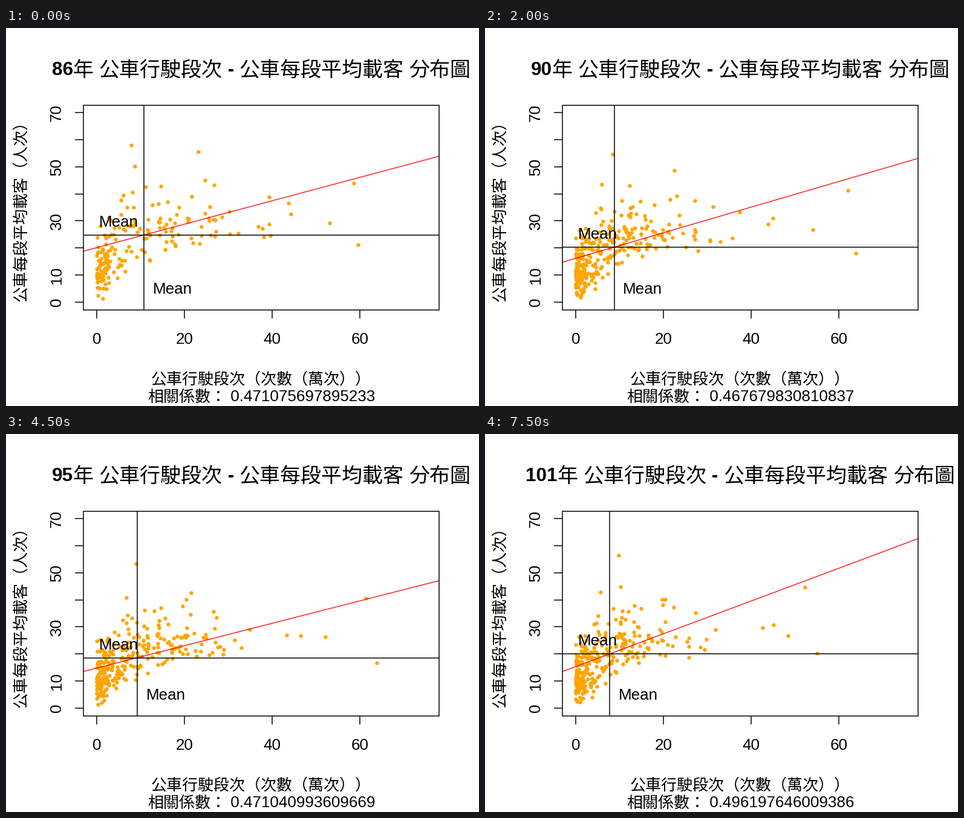
Animation of 782 by 626 pixels, one loop 8 s. Source, as a matplotlib script:

```python
import numpy as np
import matplotlib.pyplot as plt
from matplotlib.animation import FuncAnimation
from matplotlib.patches import Rectangle

W, H, DPI = 782, 626, 100
PX = 72 / DPI                               # points per pixel
LEFT, RIGHT, TOP, BOTTOM = 128, 716, 127.5, 466.5
CJK, LATIN = "Noto Sans CJK JP", "Liberation Sans"
LINE = 1.5 * PX
FIRST, FRAMES = 86, 16

# Key years; the years between are interpolated
YEARS = [86, 89, 92, 95, 97, 99, 101]
CORR = [0.471075697895233, 0.515746553273592, 0.371546385885326,
        0.471040993609669, 0.510584750146721, 0.564469082920185,
        0.496197646009386]
MEAN_X = [10.83, 8.41, 9.52, 9.24, 8.62, 8.14, 7.72]
MEAN_Y = [24.8, 20.8, 19.3, 18.6, 20.0, 19.65, 20.0]
SLOPE = [.433, .546, .329, .414, .551, .650, .606]

# Routes far from the crowd, in the first and the last year
START = np.array([(58.6, 44), (53.1, 29.3), (59.6, 21.2), (43.7, 36.6),
                  (44.3, 32.5), (39.3, 38.8), (37.8, 27.1), (23.2, 55.6),
                  (7.9, 57.9)])
END = np.array([(52.3, 44.6), (45.1, 30.7), (55, 20.2), (48.4, 26.7),
                (42.6, 29.6), (31.9, 28.9), (29.8, 25.4), (20.4, 40.2),
                (9.8, 56.5)])

rng = np.random.RandomState(7)
N = 285
rank = rng.permutation((np.arange(N) + .5) / N)
base_x = np.interp(rank, [0, .12, .4, .6, .84, .95, 1],
                   [0, .3, 2.2, 6, 13.5, 20, 28])
skew = np.clip((rng.gamma(4, 1, N) - 4) / 2, -1.8, 3)
phase = rng.uniform(0, 2 * np.pi, (2, N))


def sx(v):
    return LEFT + (RIGHT - LEFT) * (v + 3) / 81


def sy(v):
    return BOTTOM - (BOTTOM - TOP) * (v + 2.8) / 75.6


def crowd(year, mx, my):
    x = base_x * mx / 8 * (1 + .1 * np.sin(phase[0] + .5 * year))
    mid = np.interp(x, [0, 2, 5, 9, 14, 35], [11, 13, 19, 25, 26, 27])
    spread = np.interp(x, [0, 2, 5, 9, 14, 22], [5.5, 6.5, 8, 8.5, 6, 4.5])
    z = skew + .2 * np.sin(phase[1] + .6 * year)
    y = np.maximum((mid + spread * z) * np.sqrt(my / 20), .5)
    n = min(N, 180 + 27 * (year - FIRST))
    return x[:n], y[:n]


def outliers(year):
    """Drift from START to END; long routes swell midway, loads dip."""
    t = (year - FIRST) / (FRAMES - 1)
    x, y = (START + (END - START) * t).T
    arc = np.sin(np.pi * t)
    return x + .5 * arc * np.maximum(START[:, 0] - 45, 0), y - 4 * arc


def put(x, y, s, size, font=LATIN, **kw):
    ax.text(x, y, s, fontsize=size * PX, family=font, va="baseline",
            color="black", **kw)


def em(s, font):
    if font == CJK:
        return len(s)
    return sum({" ": .278, ".": .278, "-": .333}.get(c, .556) for c in s)


def put_runs(cx, runs, sizes, bases, **latin):
    """Centre a line that alternates between the two fonts."""
    x = cx - sum(em(s, f) * sizes[f] for s, f in runs) / 2
    for s, f in runs:
        put(x, bases[f], s, sizes[f], f, **(latin if f == LATIN else {}))
        x += em(s, f) * sizes[f]


def line(xs, ys, color="black", width=LINE):
    ax.plot(xs, ys, color=color, lw=width, solid_capstyle="butt")


def draw_axes():
    ax.add_patch(Rectangle((LEFT, TOP), RIGHT - LEFT, BOTTOM - TOP,
                           fill=False, ec="black", lw=LINE, zorder=3))
    upright = dict(rotation=90, rotation_mode="anchor")
    for v in range(0, 61, 20):
        line([sx(v)] * 2, [BOTTOM, BOTTOM + 14.5])
        put(sx(v), 523, str(v), 26, ha="center")
    for v in range(0, 71, 10):
        line([LEFT - 14.5, LEFT], [sy(v)] * 2)
        if v in (0, 10, 30, 50, 70):
            put(91, sy(v), str(v), 26, ha="center", **upright)
    put(32.5, 453, "公車每段平均載客（人次）", 26, CJK, ha="left", **upright)
    put(240, 590, "公車行駛段次（次數（萬次））", 26, CJK)


def draw(i):
    year = FIRST + i
    corr, mx, my, slope = (np.interp(year, YEARS, v)
                           for v in (CORR, MEAN_X, MEAN_Y, SLOPE))
    ax.clear()
    ax.set(xlim=(0, W), ylim=(H, 0))
    ax.axis("off")

    for x, y in (crowd(year, mx, my), outliers(year)):
        ax.plot(sx(x), sy(y), "o", color="#ffa500", ms=6.4 * PX, mew=0)
    ends = np.array([-3, 78])
    line(sx(ends), sy(my + slope * (ends - mx)), "red", 1.3 * PX)
    line([LEFT, RIGHT], [sy(my)] * 2)
    line([sx(mx)] * 2, [TOP, BOTTOM])
    put(sx(5), sy(my + 5) + 8.5, "Mean", 26, ha="center")
    put(sx(mx + 6.5), sy(5) + 8.5, "Mean", 26, ha="center")
    draw_axes()

    put_runs(422, [(str(year), LATIN), ("年", CJK), (" ", LATIN),
                   ("公車行駛段次", CJK), (" - ", LATIN),
                   ("公車每段平均載客", CJK), (" ", LATIN), ("分布圖", CJK)],
             {CJK: 34, LATIN: 31.5}, {CJK: 80, LATIN: 78}, weight="bold")
    put_runs(422, [("相關係數：", CJK), (f" {corr:.15f}", LATIN)],
             {CJK: 26, LATIN: 26}, {CJK: 620, LATIN: 618})
    return []


fig = plt.figure(figsize=(W / DPI, H / DPI), dpi=DPI, facecolor="white")
ax = fig.add_axes([0, 0, 1, 1])
anim = FuncAnimation(fig, draw, frames=FRAMES, interval=500,
                     init_func=lambda: [], repeat=True)
plt.show()
```
